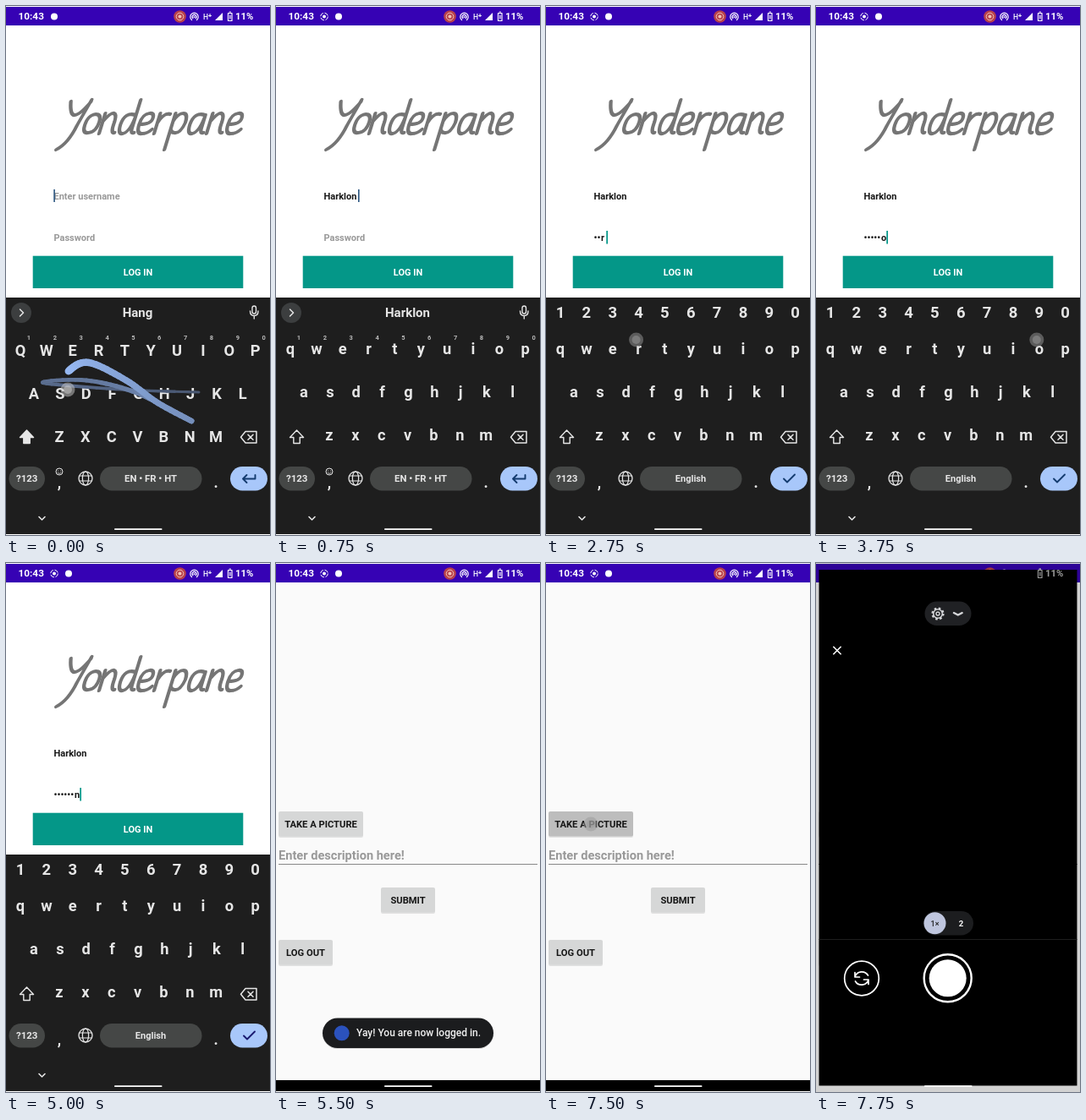
An HTML page for the animation above (8000 ms loop, 312 px wide and 626 px high).

```html
<!DOCTYPE html>
<html lang="en">
<head>
<meta charset="utf-8">
<title>Login demo</title>
<style>
html, body { margin: 0; width: 100%; height: 100%; overflow: hidden; background: #fff; }
svg { display: block; font-family: Roboto, sans-serif; font-weight: 500; }
</style>
</head>
<body>
<svg id="stage" width="312" height="626" viewBox="0 0 312 626"></svg>
<script>
const LOOP = 8000, STEP = 250;
const NAME = 'Harklon', SECRET = NAME.toLowerCase();
const ROWS = ['qwertyuiop', 'asdfghjkl', 'zxcvbnm'];
const ROW_X = [17, 33, 63], ROW_Y = [406, 457, 508], PITCH = 30.85;
// Step at which each password character is typed
const TYPED = [9, 10, 11, 12, 13, 15, 18];

const rect = (x, y, w, h, fill, r = 0, more = '') =>
  `<rect x="${x}" y="${y}" width="${w}" height="${h}" rx="${r}" fill="${fill}" ${more}/>`;
const circle = (x, y, r, fill, more = '') =>
  `<circle cx="${x}" cy="${y}" r="${r}" fill="${fill}" ${more}/>`;
const line = (d, color, width = 1.5, more = '') =>
  `<path d="${d}" fill="none" stroke="${color}" stroke-width="${width}" stroke-linecap="round" stroke-linejoin="round" ${more}/>`;
const shape = (d, fill) => `<path d="${d}" fill="${fill}"/>`;
const text = (s, x, y, size, fill, anchor = 'middle', weight = 700) =>
  `<text x="${x}" y="${y}" font-size="${size}" fill="${fill}" text-anchor="${anchor}" font-weight="${weight}">${s}</text>`;
const touch = (x, y, fill = '#999') =>
  circle(x, y, 8.5, fill, 'opacity=".5"') + circle(x, y, 5, fill, 'opacity=".5"');
const navLine = () => rect(128, 618.3, 56.5, 1.7, '#fff', 0.8);

function battery(color) {
  return line('M262.5 8.5h4.500v9h-4.500zM264 7h1.500M264.800 11v4', color, 1.2) +
    text('11%', 271, 16.3, 11.3, color, 'start');
}

function statusBar(recording) {
  const w = '#fff';
  return rect(0, 1, 312, 22, '#3602b4') +
    text('10:43', 14.5, 16.4, 11.8, w, 'start') +
    (recording ? circle(57, 12.5, 4.3, 'none', `stroke="${w}" stroke-dasharray="5 1.75"`) + circle(57, 12.5, 2, w) : '') +
    circle(recording ? 74 : 57, 12.5, 4, w) +
    circle(205.5, 12.5, 7.3, '#b8404a') + circle(205.5, 12.5, 4.3, 'none', 'stroke="#f0c4b8"') + circle(205.5, 12.5, 2, '#f0c4b8') +
    line('M219.500 16.500a4.700 4.700 0 1 1 6 0M220.800 14.500a2.400 2.400 0 1 1 3.400 0', w, 1.2) + circle(222.5, 13, 1, w) +
    text('H', 233, 16, 8.5, w, 'start', 500) + text('+', 239, 14, 7.5, w, 'start') +
    shape('M247 17L256 8V17z', w) + battery(w);
}

// Monoline lettering: [stroke, advance]
const GLYPHS = {
  Y: ['M2-38q4 17 10 16t14-16M26-40l-8 30q-4 22-16 29', 26],
  o: ['M10-23q-9 1-9 13q0 10 7 9q9-1 9-13q0-9-7-9', 20],
  n: ['M1-24v24M1-14q6-11 10-10t4 10q-1 14 4 13', 22],
  d: ['M15-22q-13-4-14 11q0 12 6 11q8-2 9-22M16-40v34q0 6 4 5', 22],
  e: ['M2-11q13 0 13-7t-6-6q-8 1-8 13t7 11q6 0 10-5', 20],
  r: ['M2-24v24M2-12q4-13 12-11', 18],
  p: ['M2-24v43M2-14q3-10 9-10t6 11q-2 13-9 12q-4 0-6-4', 22],
  a: ['M15-22q-13-4-14 11q0 12 6 11q8-2 9-22v16q0 6 4 5', 23]
};
function lettering(word) {
  let x = 0;
  const strokes = [...word].map(ch => {
    const [d, advance] = GLYPHS[ch];
    const glyph = line(d, '#757575', 4.2, `transform="translate(${x})"`);
    x += advance;
    return glyph;
  });
  return `<g role="img" aria-label="${word}" transform="translate(63 151) skewX(-17)">${strokes.join('')}</g>`;
}
const TITLE = lettering('Yonderpane');

function loginForm(step) {
  const named = step >= 3, count = TYPED.filter(s => s <= step).length;
  let s = rect(0, 0, 312, 626, '#fff') + statusBar(step >= 2) + TITLE;
  s += text(named ? NAME : 'Enter username', 56.5, 229.3, 11, named ? '#161616' : '#999', 'start');
  if (step < 5) s += rect(named ? 97 : 56.3, 217, 1.6, 15, '#2a5580');
  const end = 57 + 4 * Math.max(0, count - 1);
  if (count) {
    s += text('•'.repeat(count - 1), 56.5, 278, 11, '#161616', 'start') +
      text(SECRET[count - 1], end, 278, 11, '#161616', 'start');
  } else s += text('Password', 56.5, 278, 11, '#999', 'start');
  if (step >= 5 && step !== 7 && step !== 17) s += rect(end + (count ? 6.3 : 0), 266, 1.7, 15.5, '#009688');
  return s + rect(31.7, 295.7, 248.6, 38.3, '#049788') + text('LOG IN', 156, 319, 11, '#fff');
}

function keyPoint(ch) {
  const row = ROWS.findIndex(r => r.includes(ch));
  return [ROW_X[row] + PITCH * ROWS[row].indexOf(ch), ROW_Y[row]];
}

function keyboard(step) {
  const ink = '#e6e6e6', pill = '#454746', caps = step < 3, secret = step >= 5;
  let s = rect(0, 345, 312, 280, '#1e1e1e');
  for (const ch of ROWS.join('')) {
    const [x, y] = keyPoint(ch);
    s += text(caps ? ch.toUpperCase() : ch, x, y + (caps ? 8 : 5.5), 18.3, ink, 'middle', 600);
  }
  for (let i = 0; i < 10; i++) {
    const digit = (i + 1) % 10, x = 17 + PITCH * i;
    if (!secret) s += text(digit, x + 10, 395, 7.5, '#bbb');
    else if (step >= 8) s += text(digit, x, 369, 18.5, ink, 'middle', 600);
  }
  if (!secret) {
    s += circle(18, 363, 12, '#3c3e3f') + line('M16.500 359l4 4l-4 4', ink) +
      text(['Hang', 'Hark'][step] || NAME, 155.5, 367.7, 15, ink) +
      rect(291, 355, 4.5, 9, 'none', 2.2, `stroke="${ink}" stroke-width="1.4"`) +
      line('M288.500 361q0 5.500 4.750 5.500t4.750-5.500M293.250 367v3', ink, 1.4);
  } else if (step === 6 || step === 7) {
    s += rect(108.5, 349.5, 94.5, 26.5, '#383939', 13.25, 'stroke="#777"') +
      circle(122, 363, 2.6, 'none', 'stroke="#a8c7fa" stroke-width="2.400"') +
      line('M125.500 363h6.500v2M129.500 363v2', '#a8c7fa', 2.2) +
      text('Passwords', 138, 367, 11.2, ink, 'start');
  }
  s += `<path d="M24.500 502l8 8.500h-4.300v7h-7.400v-7h-4.300z" fill="${caps ? ink : 'none'}" stroke="${ink}" stroke-width="1.400" stroke-linejoin="round"/>` +
    line('M283 503.500h13v13.500h-13l-5.500-6.750zM286 507.200l6 6m0-6l-6 6', ink) +
    rect(3.5, 545, 42.5, 28.5, pill, 14.2) + text('?123', 24.7, 563, 11.5, ink) +
    text(',', 63, 570, 18, ink) + text('.', 248, 570, 18, ink);
  if (!secret) {
    s += circle(63, 551, 4, 'none', `stroke="${ink}"`) + circle(61.6, 550, 0.6, ink) + circle(64.4, 550, 0.6, ink) +
      line('M61 552.500q2 2 4 0', ink, 0.8);
  }
  s += circle(94, 559, 8, 'none', `stroke="${ink}" stroke-width="1.300"`) +
    `<ellipse cx="94" cy="559" rx="3.600" ry="8" fill="none" stroke="${ink}" stroke-width="1.200"/>` +
    line('M87 556h14M87 562h14', ink, 1.2) +
    rect(111, 545, 120.5, 28.5, pill, 14.2) +
    (secret ? text('English', 171, 562.7, 11, ink) : text('EN • FR • HT', 171, 562.7, 11.3, ink)) +
    rect(265, 545, 44, 28.5, '#a8c7fa', 14.2) +
    line(secret ? 'M281 559.500l4 4l9-9' : 'M294.500 555v4.500h-14.500m4.500-4.500l-4.500 4.500l4.500 4.500', step === 20 ? '#1a1a70' : '#143c70', 1.9) +
    line('M39 604.500l3.500 3.500l3.500-3.500', ink, 1.6);
  return s + navLine();
}

// Glide-typing stroke; each step shows a window of it
const GLIDE = [[228, 457], [140, 454], [44, 446], [95, 443], [155, 458], [219, 491], [180, 470], [142, 443], [98, 422], [74, 432], [66, 450], [258, 402], [218, 500]];
const GLIDE_WINDOWS = [[0, 9], [5, 11], [9, 12]];
const FINGER = [[73, 454], [261, 406], [217, 506]];

function glidePoint(u) {
  const i = Math.min(Math.floor(u), GLIDE.length - 2), f = u - i;
  const at = k => GLIDE[Math.max(0, Math.min(GLIDE.length - 1, k))];
  return [0, 1].map(c => {
    const [p, q, r, v] = [at(i - 1)[c], at(i)[c], at(i + 1)[c], at(i + 2)[c]];
    return q + f / 2 * (r - p + f * (2 * p - 5 * q + 4 * r - v + f * (3 * (q - r) + v - p)));
  });
}
function glide(step) {
  const [from, to] = GLIDE_WINDOWS[step], n = 90;
  let s = '';
  for (let i = 0; i < n; i++) {
    const k = i / n, a = glidePoint(from + (to - from) * k), b = glidePoint(from + (to - from) * (i + 1) / n);
    const color = `rgb(${[[72, 150], [86, 184], [112, 242]].map(([lo, hi]) => Math.round(lo + (hi - lo) * k))})`;
    s += line(`M${a}L${b}`, color, 3 + 6 * k);
  }
  return s + touch(...FINGER[step], '#ccc');
}

function login(step) {
  let s = loginForm(step) + keyboard(step);
  if (step < 3) s += glide(step);
  if (step === 4) s += touch(286, 557);
  const key = TYPED.indexOf(step);
  if (key >= 0) {
    const [x, y] = keyPoint(SECRET[key]);
    s += touch(x - 3, y - 11);
  }
  return s;
}

const button = (label, x, y, w, fill = '#d6d7d7') =>
  rect(x, y + 1, w, 30, '#000', 2, 'opacity=".1"') + rect(x, y, w, 29.5, fill, 2) +
  text(label, x + w / 2, y + 19, 11.2, '#161616');

function home(step) {
  const pressed = step === 30;
  let s = rect(0, 0, 312, 626, '#fafafa') + statusBar(true) +
    button('TAKE A PICTURE', 3, 294, 100, pressed ? '#bdbdbd' : undefined) +
    text('Enter description here!', 3, 350.5, 14.6, '#999', 'start') + rect(3, 356, 306, 1, '#888') +
    button('SUBMIT', 124, 384, 64) + button('LOG OUT', 3, 446, 64) +
    rect(0, 612, 312, 13, '#000') + navLine();
  if (step >= 22 && step < 29) {
    s += rect(55, 540, 202, 35, '#000', 17.5, 'opacity=".15"') + rect(55, 538.5, 202, 35.5, '#1b1c1e', 17.7) +
      circle(77.7, 556.3, 9, '#2b52bd') + text('Yay! You are now logged in.', 95, 560.3, 12, '#f1f1f1', 'start', 500);
  }
  return pressed ? s + touch(53, 309) : s;
}

function camera() {
  const w = '#fff', soft = '#d4d5d8';
  return home(31) + rect(0, 612, 312, 14, '#fafafa') + rect(0, 0, 312, 626, '#000', 0, 'opacity=".16"') +
    rect(3.5, 8, 305, 610.5, '#000') + battery('#999') + navLine() +
    rect(128.5, 45.5, 55, 28.5, '#202124', 14.2) +
    circle(144, 60, 6.3, 'none', `stroke="${soft}" stroke-width="2.600" stroke-dasharray="2.474"`) +
    circle(144, 60, 5.3, 'none', `stroke="${soft}" stroke-width="1.500"`) + circle(144, 60, 2, 'none', `stroke="${soft}" stroke-width="1.400"`) +
    line('M163 59l4.800 2.500l4.800-2.500', soft, 2.5) +
    line('M20.800 99.300l8.400 8.400m0-8.400l-8.400 8.400', w, 1.6) +
    rect(127, 412, 59, 28.5, '#1c1d1f', 14.2) + circle(140.5, 426.3, 13, '#bfc6de') +
    text('1×', 140.5, 429.5, 9, '#222', 'middle', 500) + text('2', 171.5, 429.5, 9.5, w) +
    rect(3.5, 445, 305, 1, '#1d1d1d') +
    circle(54, 491.5, 20.3, 'none', `stroke="${w}" stroke-width="1.700"`) +
    line('M46 490v-5.500m0 5.500h5.500M46 490a8.500 8.500 0 0 1 15.500-2M62 493v5.500m0-5.500h-5.500M62 493a8.500 8.500 0 0 1-15.500 2', w, 1.7) +
    circle(155.7, 491.3, 28, 'none', `stroke="${w}" stroke-width="2.400"`) + circle(155.7, 491.3, 22, w);
}

function scene(step) {
  if (step < 21) return login(step);
  if (step === 21) return login(20) + `<g opacity=".6">${home(21)}</g>`;
  return step < 31 ? home(step) : camera();
}

const stage = document.getElementById('stage');
let shown = -1;
function tick() {
  const step = Math.floor(performance.now() % LOOP / STEP);
  if (step !== shown) stage.innerHTML = scene(shown = step);
  requestAnimationFrame(tick);
}
tick();
</script>
</body>
</html>
```
